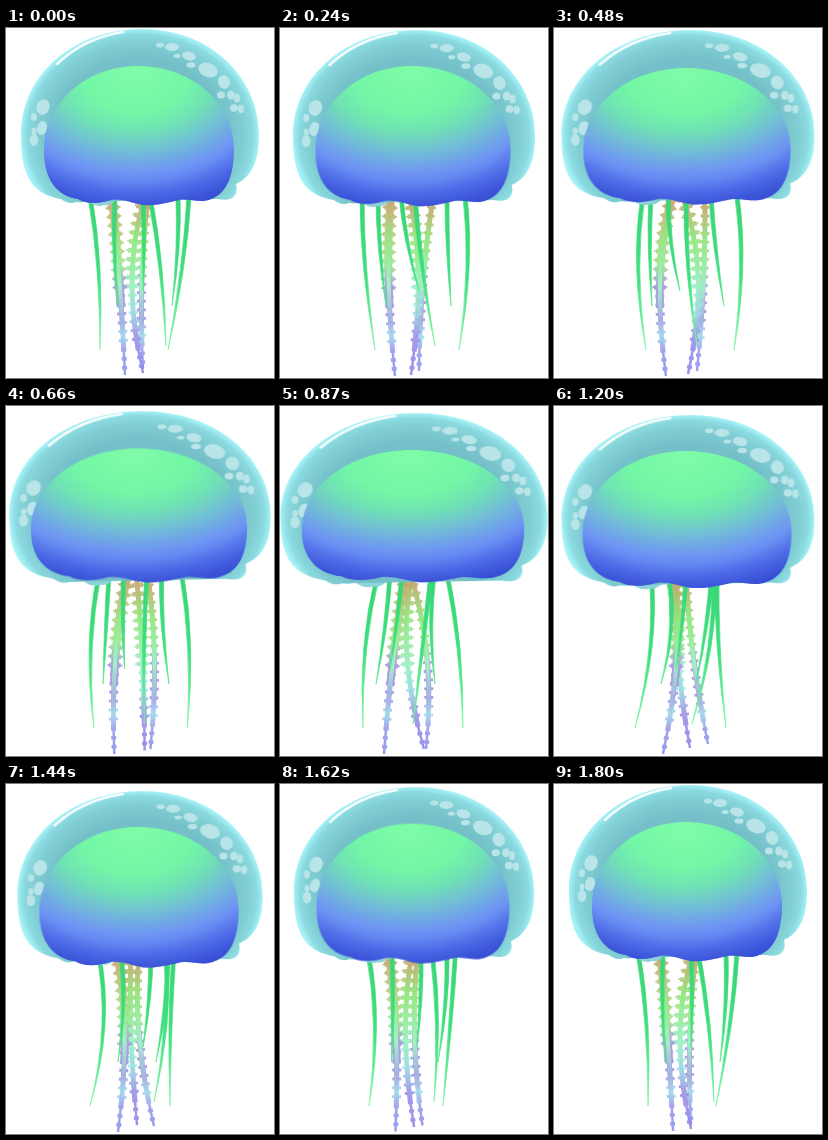
These frames come from a looping animation (268 px wide and 350 px high, 1830 ms). An HTML page without scripts:

```html
<!DOCTYPE html>
<html lang="en">
<head>
<meta charset="utf-8">
<title>Jellyfish</title>
<style>
html, body { margin: 0; width: 100%; height: 100%; overflow: hidden; background: #fff; }
svg { display: block; width: 268px; height: 350px; }

/* bell pulse */
.shell, .dome { animation: 1.83s infinite; }
.shell { transform-origin: 134px 1px; animation-name: shell; }
.dome { transform-origin: 133px 38px; animation-name: dome; }
@keyframes shell {
  0% { transform: none; animation-timing-function: cubic-bezier(.33,0,.67,.4); }
  13.1% { transform: translateY(1px) scale(1.017, 1); animation-timing-function: linear; }
  26.2% { transform: translateY(1px) scale(1.063, .99); animation-timing-function: cubic-bezier(.33,.37,.67,1); }
  47.5% { transform: translateY(6px) scale(1.122, .985); animation-timing-function: cubic-bezier(.33,0,.67,.67); }
  65.6% { transform: translateY(8px) scale(1.063, .985); animation-timing-function: linear; }
  78.7% { transform: translateY(6px) scale(1.03, .985); animation-timing-function: cubic-bezier(.33,.47,.67,1); }
  98.4%, 100% { transform: none; }
}
@keyframes dome {
  0% { transform: none; animation-timing-function: cubic-bezier(.33,0,.67,.4); }
  13.1% { transform: scale(1.026, 1.007); animation-timing-function: linear; }
  26.2% { transform: translateY(2px) scale(1.09, .98); animation-timing-function: cubic-bezier(.33,.37,.67,1); }
  47.5% { transform: translateY(6px) scale(1.17, .95); animation-timing-function: cubic-bezier(.33,0,.67,.67); }
  65.6% { transform: translateY(7px) scale(1.1, .985); animation-timing-function: linear; }
  78.7% { transform: translateY(5px) scale(1.048, 1.01); animation-timing-function: cubic-bezier(.33,.47,.67,1); }
  98.4%, 100% { transform: none; }
}

/* frilled arms: wide short dashes over narrow long ones make pointed teeth */
.arm { fill: none; }
.peak { stroke-width: 15; stroke-dasharray: 1 4 1 4 1 4 1 4 1 4 1 4 1 4 1 4 1 4 1 4 1 4 0 200; }
.slope { stroke-width: 11.5; stroke-dasharray: 2.6 2.4 2.6 2.4 2.6 2.4 2.6 2.4 2.6 2.4 2.6 2.4 2.6 2.4 2.6 2.4 2.6 2.4 2.6 2.4 2.6 2.4 0 200; stroke-dashoffset: .8; }
.trunk { stroke-width: 8; stroke-dasharray: 62 200; }
.stem { stroke-width: 5; stroke-dasharray: 86 200; }
.tooth { stroke-width: 9; stroke-dasharray: 1.6 3.4 1.6 3.4 1.6 3.4 1.6 3.4 1.6 3.4 1.6 3.4 1.6 3.4 1.6 3.4 1.6 3.4 1.6 3.4 1.6 3.4 1.6 3.4 1.6 3.4 1.6 3.4 1.6 3.4 1.6 3.4 1.6 3.4 0 200; stroke-dashoffset: .3; }
.nub { stroke-width: 5; stroke-dasharray: 2 3; }
.tip { stroke-width: 2.5; }
.vein { stroke: url(#veinTone); stroke-width: 4; }
</style>
</head>
<body>
<svg viewBox="0 0 268 350">
<defs>
  <radialGradient id="shellTone" cx="0" cy="0" r="1" gradientTransform="translate(.5 .61) scale(.5 .61)">
    <stop offset=".72" stop-color="#74bfc8"/>
    <stop offset=".87" stop-color="#80ced4"/>
    <stop offset=".95" stop-color="#8bdae0"/>
    <stop offset="1" stop-color="#a4f2f6"/>
  </radialGradient>
  <radialGradient id="domeTone" cx=".48" cy=".05" r="1">
    <stop offset="0" stop-color="#80fca8"/>
    <stop offset=".28" stop-color="#72f7a6"/>
    <stop offset=".42" stop-color="#70e2b4"/>
    <stop offset=".56" stop-color="#72bfd6"/>
    <stop offset=".72" stop-color="#6e94f4"/>
    <stop offset=".87" stop-color="#5674ee"/>
    <stop offset="1" stop-color="#3e55d8"/>
  </radialGradient>
  <radialGradient id="domeRim" cx=".48" cy=".2" r=".85">
    <stop offset=".74" stop-color="#3048d0" stop-opacity="0"/>
    <stop offset="1" stop-color="#3048d0" stop-opacity=".6"/>
  </radialGradient>
  <linearGradient id="thread" gradientUnits="userSpaceOnUse" x1="0" x2="0" y1="170" y2="322">
    <stop offset="0" stop-color="#38d576"/>
    <stop offset=".5" stop-color="#40e07e"/>
    <stop offset="1" stop-color="#7cf5a4"/>
  </linearGradient>
  <linearGradient id="warm" gradientUnits="userSpaceOnUse" x1="0" x2="0" y1="172" y2="348">
    <stop offset="0" stop-color="#c99f6c"/>
    <stop offset=".15" stop-color="#b5c878"/>
    <stop offset=".36" stop-color="#9fe58c"/>
    <stop offset=".5" stop-color="#a596e0"/>
    <stop offset=".68" stop-color="#a092e4"/>
    <stop offset=".77" stop-color="#a2e4f0"/>
    <stop offset=".86" stop-color="#9a98ea"/>
    <stop offset="1" stop-color="#8a94ee"/>
  </linearGradient>
  <linearGradient id="cool" gradientUnits="userSpaceOnUse" x1="0" x2="0" y1="172" y2="348">
    <stop offset="0" stop-color="#c4aa70"/>
    <stop offset=".2" stop-color="#a2e07c"/>
    <stop offset=".42" stop-color="#9cecb0"/>
    <stop offset=".62" stop-color="#a0eef2"/>
    <stop offset=".76" stop-color="#9c8ce6"/>
    <stop offset="1" stop-color="#8f88e8"/>
  </linearGradient>
  <linearGradient id="veinTone" gradientUnits="userSpaceOnUse" x1="0" x2="0" y1="172" y2="330">
    <stop offset="0" stop-color="#d09a68"/>
    <stop offset=".25" stop-color="#84ea78"/>
    <stop offset=".55" stop-color="#98f0c0"/>
    <stop offset="1" stop-color="#9a90ee" stop-opacity="0"/>
  </linearGradient>

  <path id="left" pathLength="100">
    <animate attributeName="d" dur="1.83s" repeatCount="indefinite" keyTimes="0;.131;.262;.475;.656;.787;.984;1"
      values="M106 170Q114 240 119 347;M111 170Q104 240 115 348;M118 170Q97 240 112 348;M126 170Q112 240 104 348;M119 170Q132 240 109 348;M111 170Q126 240 112 348;M106 170Q114 240 119 347;M106 170Q114 240 119 347"/>
  </path>
  <path id="middle" pathLength="100">
    <animate attributeName="d" dur="1.83s" repeatCount="indefinite" keyTimes="0;.131;.262;.475;.656;.787;.984;1"
      values="M139 170Q114 245 137 345;M130 170Q146 245 131 347;M129 170Q157 245 134 346;M132 170Q116 245 144 343;M124 170Q118 245 136 342;M125 170Q122 245 131 341;M139 170Q114 245 137 345;M139 170Q114 245 137 345"/>
  </path>
  <path id="right" pathLength="100">
    <animate attributeName="d" dur="1.83s" repeatCount="indefinite" keyTimes="0;.131;.262;.475;.656;.787;.984;1"
      values="M142 170Q132 250 137 341;M153 170Q140 250 139 343;M151 170Q152 250 143 343;M131 170Q156 250 146 343;M132 170Q136 250 154 338;M133 170Q126 250 148 342;M142 170Q132 250 137 341;M142 170Q132 250 137 341"/>
  </path>
  <path id="body" d="M38 123C38 75 80 38 132 38C185 38 228 75 228 120C228 145 222 165 205 171C195 176 183 170 173 172C160 175 150 178 137 177C125 175 115 170 105 172C92 176 80 176 72 171C50 168 38 150 38 123Z"/>
</defs>

<g class="arm" stroke="url(#warm)" opacity=".9">
  <use href="#right" class="tooth"/>
  <use href="#right" class="stem"/>
  <use href="#right" class="nub"/>
  <use href="#right" class="tip"/>
  <use href="#right" class="vein"/>
</g>
<g class="arm" stroke="url(#cool)" opacity=".9">
  <use href="#middle" class="peak"/>
  <use href="#middle" class="slope"/>
  <use href="#middle" class="tooth"/>
  <use href="#middle" class="stem"/>
  <use href="#middle" class="nub"/>
  <use href="#middle" class="tip"/>
  <use href="#middle" class="vein"/>
</g>
<g class="arm" stroke="url(#warm)" opacity=".9">
  <use href="#left" class="peak"/>
  <use href="#left" class="slope"/>
  <use href="#left" class="trunk"/>
  <use href="#left" class="tooth"/>
  <use href="#left" class="stem"/>
  <use href="#left" class="nub"/>
  <use href="#left" class="tip"/>
  <use href="#left" class="vein"/>
</g>

<g fill="url(#thread)" stroke="url(#thread)" stroke-width=".7" stroke-linejoin="round">
  <path><animate attributeName="d" dur="1.83s" repeatCount="indefinite" keyTimes="0;.131;.262;.475;.656;.787;.984;1"
    values="M82 168q12 70 12 154q4 -84 -8 -154z;M80 168q0 70 15 154q-11 -84 -11 -154z;M87 168q-11 70 5 154q-12 -84 -1 -154z;M96 168q-18 70 -13 154q-1 -84 17 -154z;M95 168q7 70 -14 154q25 -84 18 -154z;M90 168q15 70 -6 154q25 -84 10 -154z;M82 168q12 70 12 154q4 -84 -8 -154z;M82 168q12 70 12 154q4 -84 -8 -154z"/></path>
  <path><animate attributeName="d" dur="1.83s" repeatCount="indefinite" keyTimes="0;.131;.262;.475;.656;.787;.984;1"
    values="M107 168q-2 50 4 110q-2 -60 0 -110z;M96 168q0 50 10 110q-6 -60 -6 -110z;M95 168q-3 50 3 110q-2 -60 1 -110z;M108 168q-3 50 -12 110q13 -60 16 -110z;M112 168q10 50 -5 110q19 -60 9 -110z;M113 168q6 50 -1 110q11 -60 5 -110z;M107 168q-2 50 4 110q-2 -60 0 -110z;M107 168q-2 50 4 110q-2 -60 0 -110z"/></path>
  <path><animate attributeName="d" dur="1.83s" repeatCount="indefinite" keyTimes="0;.131;.262;.475;.656;.787;.984;1"
    values="M135 168q2 45 2 95q4 -50 2 -95z;M119 168q4 45 20 95q-12 -50 -16 -95z;M112 168q0 45 14 95q-10 -50 -10 -95z;M120 168q-4 45 -10 95q10 -50 14 -95z;M130 168q-2 45 -8 95q10 -50 12 -95z;M143 168q0 45 -6 95q10 -50 10 -95z;M135 168q2 45 2 95q4 -50 2 -95z;M135 168q2 45 2 95q4 -50 2 -95z"/></path>
  <path><animate attributeName="d" dur="1.83s" repeatCount="indefinite" keyTimes="0;.131;.262;.475;.656;.787;.984;1"
    values="M142 168q13 70 18 150q-1 -80 -14 -150z;M133 168q5 70 22 150q-13 -80 -18 -150z;M130 168q-1 70 13 150q-10 -80 -9 -150z;M149 168q-8 70 -16 150q12 -80 20 -150z;M158 168q2 70 -20 150q26 -80 24 -150z;M158 168q5 70 -10 150q19 -80 14 -150z;M142 168q13 70 18 150q-1 -80 -14 -150z;M142 168q13 70 18 150q-1 -80 -14 -150z"/></path>
  <path><animate attributeName="d" dur="1.83s" repeatCount="indefinite" keyTimes="0;.131;.262;.475;.656;.787;.984;1"
    values="M170 168q2 50 -4 110q10 -60 8 -110z;M165 168q0 50 6 110q-2 -60 -2 -110z;M155 168q3 50 15 110q-8 -60 -11 -110z;M152 168q-6 50 3 110q-5 -60 1 -110z;M156 168q-4 50 -14 110q14 -60 18 -110z;M160 168q0 50 -10 110q14 -60 14 -110z;M170 168q2 50 -4 110q10 -60 8 -110z;M170 168q2 50 -4 110q10 -60 8 -110z"/></path>
  <path><animate attributeName="d" dur="1.83s" repeatCount="indefinite" keyTimes="0;.131;.262;.475;.656;.787;.984;1"
    values="M181 168q-4 70 -19 154q19 -84 23 -154z;M183 168q8 70 -4 154q16 -84 8 -154z;M181 168q10 70 -1 154q15 -84 5 -154z;M165 168q15 70 18 154q1 -84 -14 -154z;M161 168q-1 70 11 154q-8 -84 -7 -154z;M166 168q-5 70 -2 154q1 -84 6 -154z;M181 168q-4 70 -19 154q19 -84 23 -154z;M181 168q-4 70 -19 154q19 -84 23 -154z"/></path>
</g>

<g class="shell">
  <path fill="#8fd3da" d="M56 165Q68 178 82 173Q90 180 98 177Q106 179 112 168Z"/>
  <path fill="url(#shellTone)" d="M70 174Q63 177 55 171C27 166 15 150 15 107C15 45 70 1 136 1C205 1 253 50 253 107C253 133 246 149 230 156C233 168 226 174 212 171Z"/>
  <path fill="none" stroke="#fff" stroke-width="2.6" stroke-linecap="round" opacity=".9" d="M51 36Q78 10 117 4"/>
  <g fill="#b9e5e9">
    <ellipse cx="154" cy="17" rx="4" ry="2.5"/>
    <ellipse cx="166" cy="19" rx="7" ry="4"/>
    <ellipse cx="171" cy="28" rx="3.5" ry="2"/>
    <ellipse cx="183" cy="28" rx="7" ry="4.5" transform="rotate(15 183 28)"/>
    <ellipse cx="185" cy="37" rx="4.5" ry="2.8"/>
    <ellipse cx="202" cy="42" rx="10" ry="7" transform="rotate(20 202 42)"/>
    <ellipse cx="218" cy="54" rx="6" ry="7" transform="rotate(-20 218 54)"/>
    <ellipse cx="215" cy="67" rx="4" ry="3.5"/>
    <ellipse cx="225" cy="67" rx="3.8" ry="4.5"/>
    <ellipse cx="231" cy="70" rx="3" ry="4.5"/>
    <ellipse cx="228" cy="80" rx="4" ry="3.8"/>
    <ellipse cx="235" cy="81" rx="3" ry="4.2"/>
    <ellipse cx="37" cy="79" rx="6.5" ry="8" transform="rotate(20 37 79)"/>
    <ellipse cx="28" cy="89" rx="3" ry="4"/>
    <ellipse cx="36" cy="100" rx="5" ry="7" transform="rotate(15 36 100)"/>
    <ellipse cx="28" cy="103" rx="2.5" ry="3.5"/>
    <ellipse cx="28" cy="112" rx="4.2" ry="6"/>
  </g>
</g>

<g class="dome">
  <use href="#body" fill="url(#domeTone)"/>
  <use href="#body" fill="url(#domeRim)"/>
</g>
</svg>
</body>
</html>
```
